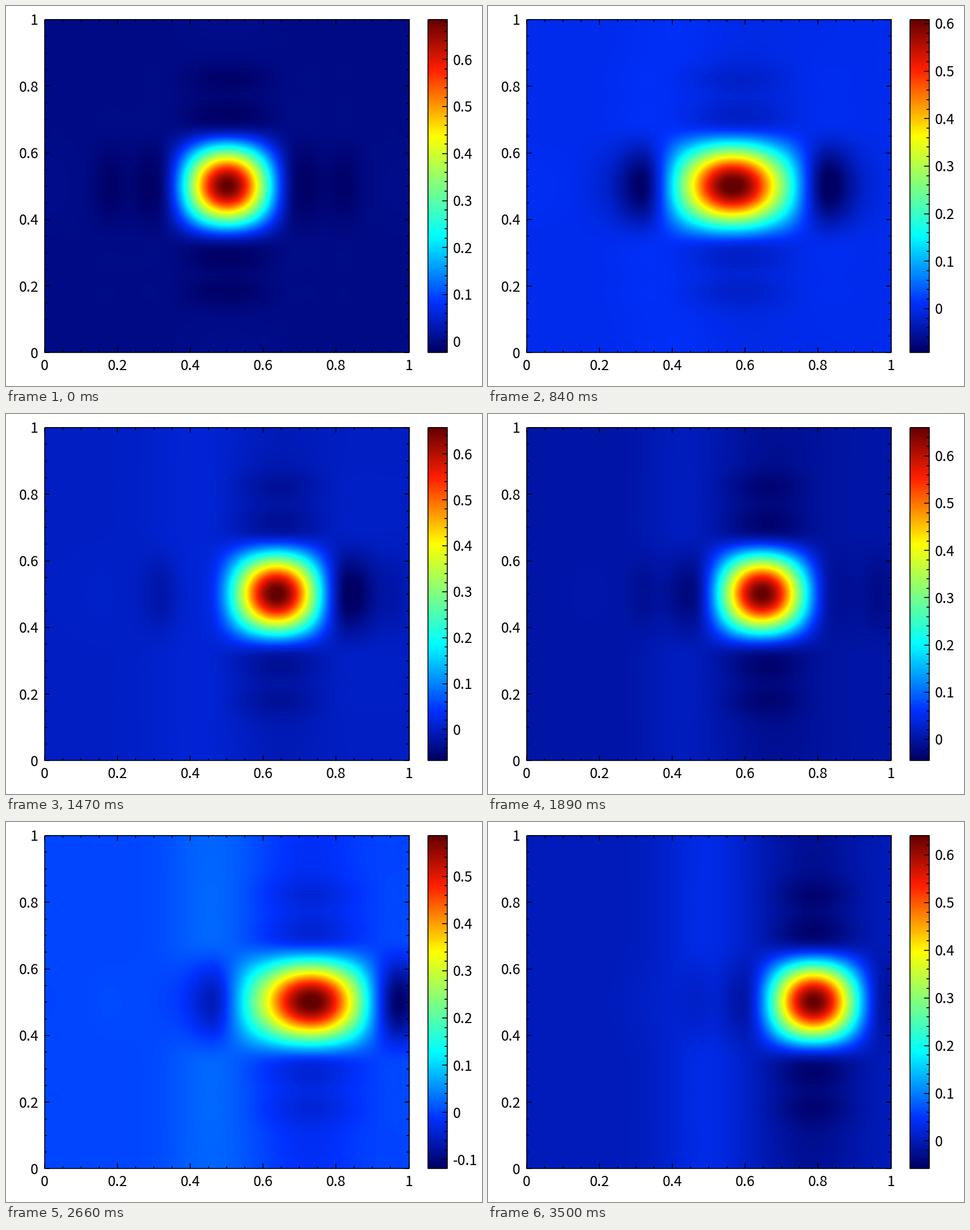
These frames come from a looping animation (837 px wide and 669 px high, 3570 ms). A matplotlib script:

```python
import numpy as np
import matplotlib.pyplot as plt
from matplotlib.animation import FuncAnimation
from matplotlib.collections import LineCollection
from matplotlib.colors import LinearSegmentedColormap

W, H, DPI = 837, 669, 100
FRAMES, STEP_MS = 51, 70
PX = 72 / DPI
LEFT, RIGHT, TOP, BOTTOM = 67.5, 708.5, 24, 610.5
BAR_L, BAR_R = 742, 775.5
CELL = 1 / 7            # distance between neighbouring bumps
CELL_FRAMES = 24.7      # frames needed to cross one cell

JET = LinearSegmentedColormap.from_list("jet_soft", [
    (0, (0, 0, 100 / 255)), (0.15, (0, 50 / 255, 1)), (0.35, (0, 1, 1)),
    (0.65, (1, 1, 0)), (0.85, (1, 30 / 255, 0)), (1, (100 / 255, 0, 0))], N=350)

# Bump weights over one cell crossing
PHASE = [0, .1, .25, .335, .5, .69, .75, .9, 1]
RISE = [0, .03, .15, .26, .65, .94, .98, 1, 1]
BEHIND = [0, -.045, -.13, -.15, -.12, -.03, -.02, -.005, 0]
AHEAD = [0, -.003, -.015, -.03, -.14, -.19, -.16, -.06, 0]

# Colour range at a few times
RANGE_AT = [0, 6, 17, 27, 33, 42, 50]
RANGE_LO = [-.0238, -.0901, -.1174, -.0451, -.0878, -.135, -.0585]
RANGE_HI = [.685, .670, .6387, .660, .632, .6154, .6406]

xs = (np.arange(321) + 0.5) / 321
ys = (np.arange(294) + 0.5) / 294


def smooth(x, px, py):
    """Cubic Hermite curve through the given points."""
    px, py = np.array(px, float), np.array(py, float)
    m = np.gradient(py, px)
    i = int(np.clip(np.searchsorted(px, x) - 1, 0, len(px) - 2))
    h = px[i + 1] - px[i]
    u = (x - px[i]) / h
    return ((1 + 2 * u) * (1 - u) ** 2 * py[i] + u * (1 - u) ** 2 * h * m[i]
            + u * u * (3 - 2 * u) * py[i + 1] + u * u * (u - 1) * h * m[i + 1])


def gauss(x, centre, width):
    return np.exp(-0.5 * ((x - centre) / width) ** 2)


def bump(x):
    """Bell with two weak negative side lobes and a faint positive one."""
    d = np.abs(x)
    core = np.where(d < .193, np.cos(np.pi * d / (2 * .193)) ** 2, 0)
    return (core - .032 * gauss(d, .215, .034) - .028 * gauss(d, .32, .034)
            + .006 * gauss(d, .48, .05))


COLUMN = bump(ys - 0.5)


def field(f):
    cell, t = divmod(f / CELL_FRAMES, 1)
    weights = (smooth(t, PHASE, BEHIND), smooth(1 - t, PHASE, RISE),
               smooth(t, PHASE, RISE), smooth(t, PHASE, AHEAD))
    row = sum(c * bump(xs - 0.5 - (cell + j) * CELL)
              for j, c in enumerate(weights, -1))
    wake = .0006 * f * (gauss(xs, .36 + .0026 * f, .085)
                        - gauss(xs, .55 + .0047 * f, .085))
    return (.685 - .0003 * f) * np.outer(COLUMN, row) + wake


LO_FIX = [lo - field(f).min() for f, lo in zip(RANGE_AT, RANGE_LO)]
HI_FIX = [hi - field(f).max() for f, hi in zip(RANGE_AT, RANGE_HI)]


def value_range(f, u):
    return (u.min() + np.interp(f, RANGE_AT, LO_FIX),
            u.max() + np.interp(f, RANGE_AT, HI_FIX))


def multiples(lo, hi, step):
    return range(int(np.ceil(lo / step - 1e-9)), int(np.floor(hi / step + 1e-9)) + 1)


# The small margin keeps the pixel size from being rounded down
fig = plt.figure(figsize=((W + 0.01) / DPI, (H + 0.01) / DPI), dpi=DPI,
                 facecolor="white")
ax = fig.add_axes([0, 0, 1, 1])
ax.axis("off")

heat = ax.imshow(field(0), cmap=JET, origin="lower", aspect="auto",
                 interpolation="bilinear", extent=(LEFT, RIGHT, BOTTOM, TOP))
ax.imshow(np.linspace(0, 1, 587)[:, None], cmap=JET, origin="lower", aspect="auto",
          interpolation="nearest", extent=(BAR_L, BAR_R, BOTTOM, TOP))
ax.set_xlim(0, W)
ax.set_ylim(H, 0)


def label(x, y, text, ha):
    return ax.text(x, y, text, ha=ha, va="baseline", color="black",
                   fontfamily="Noto Sans CJK JP", fontsize=25 * PX)


def add_lines(segments):
    lines = LineCollection(segments, colors="black", linewidths=1.6 * PX, zorder=5)
    ax.add_collection(lines, autolim=False)
    return lines


def box(l, r, t, b):
    return [(l, t), (r, t), (r, b), (l, b), (l, t)]


segments = [box(LEFT, RIGHT, TOP, BOTTOM), box(BAR_L, BAR_R, TOP, BOTTOM)]
for i in range(21):
    size = 9 if i % 4 == 0 else 4.5
    x = LEFT + (RIGHT - LEFT) * i / 20
    y = BOTTOM - (BOTTOM - TOP) * i / 20
    segments += [[(x, BOTTOM), (x, BOTTOM - size)], [(x, TOP), (x, TOP + size)],
                 [(LEFT, y), (LEFT + size, y)], [(RIGHT, y), (RIGHT - size, y)]]
    if i % 4 == 0:
        text = f"{i / 20:g}"
        label(x, 640.5, text, "center")
        label(57, y + 9.3, text, "right")
add_lines(segments)

bar_ticks = add_lines([])
bar_labels = [label(785.5, 0, "", "left") for _ in range(10)]


def update(f):
    u = field(f)
    lo, hi = value_range(f, u)
    heat.set_data(u)
    heat.set_clim(lo, hi)

    step, parts = (0.1, 5) if hi - lo < 0.7495 else (0.2, 4)

    def bar_y(v):
        return BOTTOM - (BOTTOM - TOP) * (v - lo) / (hi - lo)

    ticks = []
    for k in multiples(lo, hi, step / parts):
        y = bar_y(k * step / parts)
        ticks.append([(BAR_R, y), (BAR_R - (9 if k % parts == 0 else 4.5), y)])
    bar_ticks.set_segments(ticks)

    majors = list(multiples(lo, hi, step))
    for i, text in enumerate(bar_labels):
        shown = i < len(majors)
        text.set_visible(shown)
        if shown:
            v = majors[i] * step
            text.set_text(f"{v:.1f}" if majors[i] else "0")
            text.set_y(bar_y(v) + 9.3)
    return [heat, bar_ticks, *bar_labels]


anim = FuncAnimation(fig, update, frames=FRAMES, interval=STEP_MS,
                     repeat=True, repeat_delay=0, blit=False)
plt.show()
```
